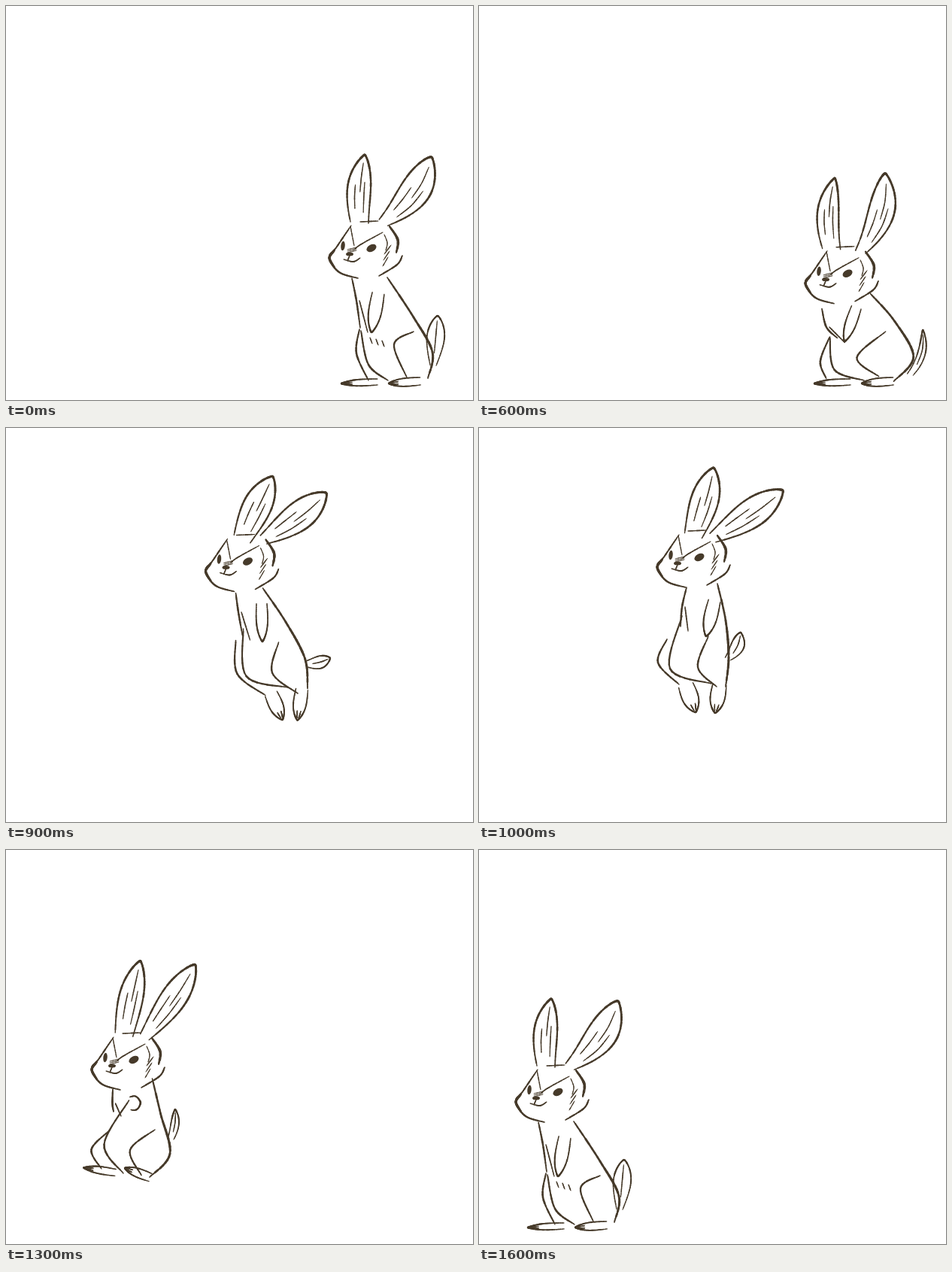
These frames come from a looping animation (621 by 524 pixels, 2600 ms). An HTML page with a canvas:

```html
<!DOCTYPE html>
<html lang="en">
<head>
<meta charset="utf-8">
<title>Hopping rabbit</title>
<style>
  html, body { margin: 0; width: 100%; height: 100%; overflow: hidden; background: #fff; }
  canvas { display: block; }
</style>
</head>
<body>
<canvas id="stage" width="621" height="524"></canvas>
<script>
const ctx = document.getElementById('stage').getContext('2d');
const INK = '#463a2a';
const LOOP = 2600;
const HOP = -381;

// Key poses. at: offset of the whole rabbit; head: right eye x, y and width scale;
// ears and tail: root, tip, bulge, bend; arm and feet: root, tip, thickness;
// the others are points on a curve.
const planted = {
  farFoot: [494, 500, 446, 502, 4],
  nearFoot: [551, 499, 509, 502, 5]
};

const sit = {
  ...planted,
  at: [0, 0],
  head: [486, 322, 1],
  farEar: [470, 288, 477, 198, 10, -4],
  nearEar: [502, 288, 566, 201, 17, 9],
  tail: [568, 478, 574, 412, 10, 0],
  arm: [495, 382, 486, 434, 8],
  chest: [460, 362, 466, 392, 471, 428],
  back: [507, 361, 542, 414, 567, 460, 561, 495],
  flank: [470, 430, 466, 462, 482, 498],
  belly: [472, 432, 482, 477, 508, 498],
  thigh: [542, 433, 516, 450, 533, 494],
  hair: [484, 441]
};

const crouch = {
  ...planted,
  at: [0, 0],
  head: [489, 347, 1],
  farEar: [469, 314, 474, 221, 9, -6],
  nearEar: [506, 317, 547, 217, 15, 10],
  tail: [572, 487, 586, 426, 5, 5],
  arm: [500, 396, 486, 443, 7],
  chest: [457, 392, 463, 418, 475, 438],
  back: [517, 377, 550, 418, 575, 465, 554, 498],
  flank: [467, 438, 457, 470, 467, 496],
  belly: [468, 438, 475, 482, 511, 498],
  thigh: [541, 433, 506, 463, 532, 493]
};

const leap = {
  at: [0, 0],
  head: [350, 191, 1],
  farEar: [343, 160, 397, 84, 14, -3],
  nearEar: [374, 159, 448, 98, 16, 4],
  tail: [468, 329, 514, 348, 6, 0],
  arm: [367, 245, 380, 299, 6],
  chest: [335, 235, 348, 260, 361, 296],
  back: [366, 227, 416, 268, 463, 316, 474, 357],
  flank: [361, 292, 377, 350, 424, 378],
  belly: [361, 292, 385, 348, 440, 358],
  thigh: [420, 301, 417, 341, 460, 370],
  farFoot: [430, 373, 447, 406, 7],
  nearFoot: [467, 362, 461, 406, 7]
};

const float = {
  at: [0, 0],
  head: [293, 172, 1],
  farEar: [285, 143, 312, 53, 13, 1],
  nearEar: [311, 146, 404, 83, 16, 2],
  tail: [331, 307, 348, 272, 7, 4],
  arm: [313, 230, 302, 277, 8],
  chest: [276, 212, 270, 238, 268, 264],
  back: [317, 207, 328, 256, 332, 305, 328, 344],
  flank: [250, 281, 238, 312, 266, 341],
  belly: [270, 250, 254, 320, 309, 340],
  thigh: [305, 277, 291, 318, 316, 344],
  farFoot: [275, 342, 288, 378, 10],
  nearFoot: [320, 341, 314, 379, 9]
};

const tuck = {
  at: [0, 0],
  head: [248, 209, 0.9],
  farEar: [241, 169, 265, 79, 11, 0],
  nearEar: [263, 175, 334, 81, 16, 2],
  tail: [251, 315, 271, 262, 6, 3],
  arm: [219, 286, 255, 241, 8],
  chest: [217, 249, 206, 264, 198, 272],
  back: [272, 240, 251, 290, 246, 345, 214, 373],
  flank: [189, 299, 158, 320, 172, 349],
  belly: [223, 252, 173, 315, 183, 362],
  thigh: [246, 302, 208, 325, 214, 368],
  farFoot: [178, 358, 142, 343, 5],
  nearFoot: [214, 372, 188, 344, 6]
};

const land = {
  ...planted,
  at: [HOP, 0],
  head: [473, 349, 1.1],
  farEar: [454, 322, 473, 216, 10, -3],
  nearEar: [487, 322, 550, 224, 12, 2],
  tail: [568, 454, 560, 428, 1, 2],
  arm: [493, 388, 484, 431, 9],
  chest: [448, 387, 458, 410, 469, 424],
  back: [498, 368, 541, 411, 571, 463, 549, 497],
  flank: [465, 449, 450, 477, 463, 499],
  belly: [485, 414, 469, 468, 510, 498],
  thigh: [531, 442, 503, 473, 527, 497]
};

const rest = { ...sit, at: [HOP, 0] };

function mix(a, b, t, lift = 0) {
  const out = {};
  for (const part in a) {
    if (part in b) out[part] = a[part].map((v, i) => v + (b[part][i] - v) * t);
  }
  out.at[1] -= lift;
  return out;
}

const steps = [
  sit, crouch, mix(sit, crouch, 1.35), mix(crouch, leap, 0.45),
  leap, mix(leap, float, 0.5, 4), float, mix(float, tuck, 0.45, 5),
  tuck, mix(tuck, land, 0.5), land, mix(land, rest, 0.55), rest
];

let seed = 1;
function rand() {
  seed = seed * 16807 % 2147483647;
  return seed / 2147483647;
}

const spline = (a, b, c, d, t) =>
  b + 0.5 * t * (c - a + t * (2 * a - 5 * b + 4 * c - d + t * (3 * (b - c) + d - a)));

// A grainy pencil line through the points, tapered at both ends.
function stroke(p, weight) {
  const n = p.length / 2;
  const sub = n > 8 ? 3 : 10;
  const count = (n - 1) * sub;
  const at = (i, k) => p[2 * Math.max(0, Math.min(n - 1, i)) + k];
  let x = p[0], y = p[1];
  for (let j = 1; j <= count; j++) {
    const i = Math.min(n - 2, Math.floor(j / sub));
    const t = j / sub - i;
    const [nx, ny] = [0, 1].map(k => spline(at(i - 1, k), at(i, k), at(i + 1, k), at(i + 2, k), t));
    const taper = Math.sqrt(Math.sin(Math.PI * (j - 0.5) / count));
    ctx.lineWidth = weight * (0.5 + 0.5 * taper) * (0.85 + 0.3 * rand());
    ctx.beginPath();
    ctx.moveTo(x, y);
    ctx.lineTo(nx, ny);
    ctx.stroke();
    x = nx;
    y = ny;
  }
}

// Point on a leaf: t runs from root to tip, k from one edge (-1) to the other (1).
function leafPoint([x0, y0, x1, y1, bulge, bend], root, t, k) {
  const len = Math.hypot(x1 - x0, y1 - y0);
  const nx = (y0 - y1) / len, ny = (x1 - x0) / len;
  const round = Math.sin(Math.PI * Math.min(1, t ** 1.4)) ** 0.7 || 0;
  const side = bend * 4 * t * (1 - t) + k * (root * (1 - t) + bulge * round);
  return [x0 + (x1 - x0) * t + nx * side, y0 + (y1 - y0) * t + ny * side];
}

function leaf(shape, root, weight) {
  const edge = [];
  for (let i = -10; i <= 10; i++) {
    const t = Math.cos(i / 10 * Math.PI / 2);
    edge.push(...leafPoint(shape, root, t, Math.sign(i)));
  }
  stroke(edge, weight);
}

function vein(shape, root, from, to, k) {
  const mid = (from + to) / 2;
  stroke([from, mid, to].flatMap(t => leafPoint(shape, root, t, k)), 1.5);
}

function ear(shape, root) {
  leaf(shape, root, 2.8);
  vein(shape, root, 0.45, 0.88, 0.1);
  vein(shape, root, 0.2, 0.55, -0.35);
  vein(shape, root, 0.15, 0.6, 0.45);
}

function limb([x0, y0, x1, y1, r], toes) {
  const shape = [x0, y0, x1, y1, 0.6 * r, 0];
  leaf(shape, r, 2.2);
  if (toes) [-0.4, 0.3].forEach(k => vein(shape, r, 0.7, 0.93, k));
}

function oval(x, y, rx, ry, turn) {
  ctx.beginPath();
  ctx.ellipse(x, y, rx, ry, turn, 0, 2 * Math.PI);
  ctx.fill();
}

function drawHead([x, y, width]) {
  ctx.save();
  ctx.translate(x, y);
  ctx.scale(width, 1);
  // Face and cheek
  stroke([-27,-30, -46,-2, -56,13, -43,32, -18,40], 2.4);
  stroke([-49,3, -56,13, -49,26], 3.2);
  stroke([24,-29, 35,-11, 33,6], 3.3);
  stroke([41,10, 34,22, 10,37], 2.2);
  stroke([-15,-35, 9,-36], 1.7);
  // Brow and fur
  stroke([-28,-29, -23,-3], 1.4);
  stroke([15,-21, -14,-5, -23,2], 1.6);
  stroke([17,-18, 21,-7, 19,3], 1.3);
  for (let i = 0; i < 3; i++) stroke([26 - 2 * i, 8 * i - 4, 17 - i, 8 * i + 8], 1.3);
  // Eyes, nose and mouth
  oval(-38, -3, 2.7, 6.2, 0.1);
  oval(0, 0, 7, 4.6, -0.5);
  oval(-29, 8, 5, 2.5, 0);
  for (let i = 0; i < 3; i++) stroke([-32, 2 + 2 * i, -20, 2 * i - 1], 0.9);
  stroke([-29,10, -32,17], 1.5);
  stroke([-37,15, -24,18, -15,13], 1.7);
  ctx.restore();
}

function drawBody(pose) {
  const [, , x, y, px, py] = pose.chest;
  stroke(pose.chest, 2.4);
  stroke([x + 4, y, px + 10, py + 6], 1.9);
  stroke(pose.back, 3);
  stroke(pose.flank, 2.4);
  stroke(pose.belly, 2.4);
  stroke(pose.thigh, 2.4);
  limb(pose.arm, false);
  limb(pose.farFoot, true);
  limb(pose.nearFoot, true);
  leaf(pose.tail, 4, 2.1);
  vein(pose.tail, 4, 0.25, 0.9, 0);
  if (pose.hair) {
    const [hx, hy] = pose.hair;
    for (let i = 0; i < 3; i++) stroke([hx + 8 * i, hy + 2 * i, hx + 8 * i + 3, hy + 2 * i + 8], 1.4);
  }
}

function draw(pose) {
  seed = 7;
  ctx.fillStyle = '#fff';
  ctx.fillRect(0, 0, 621, 524);
  ctx.fillStyle = ctx.strokeStyle = INK;
  ctx.lineCap = 'round';
  ctx.save();
  ctx.translate(...pose.at);
  ear(pose.farEar, 12);
  ear(pose.nearEar, 7);
  drawHead(pose.head);
  drawBody(pose);
  ctx.restore();
}

const start = performance.now();
function tick() {
  const ms = (performance.now() - start) % LOOP;
  const step = Math.floor((ms - 400) / 100);
  draw(steps[Math.max(0, Math.min(steps.length - 1, step))]);
  requestAnimationFrame(tick);
}
tick();
</script>
</body>
</html>
```
